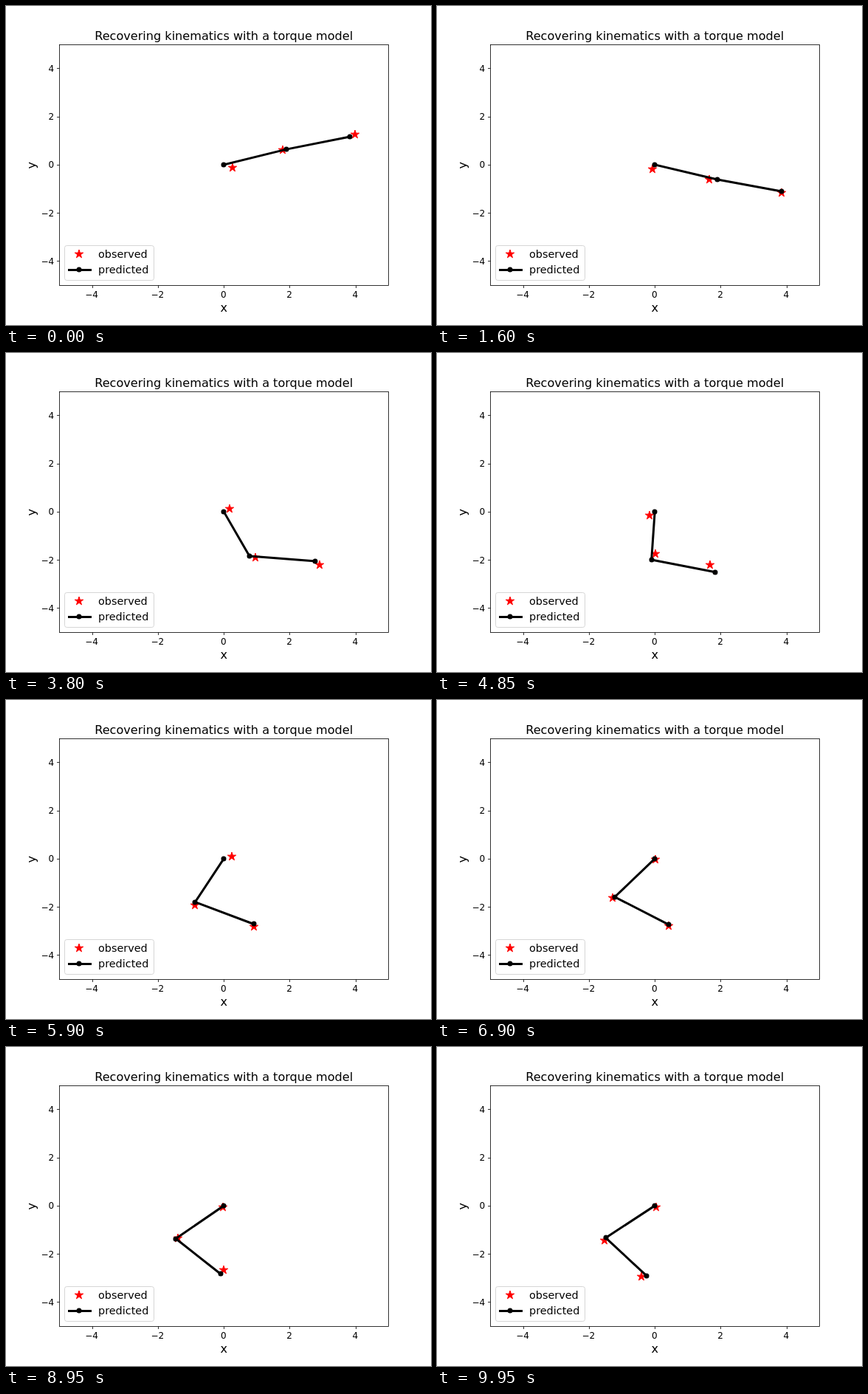
An HTML page that plays this animation: 576x432 px, repeating every 10 s.

```html
<!DOCTYPE html>
<html lang="en">
<head>
<meta charset="utf-8">
<style>
  html, body { margin: 0; width: 576px; height: 432px; overflow: hidden; background: #fff; }
  svg { display: block; font-family: "DejaVu Sans", sans-serif; font-size: 12px; }
  .label { font-size: 16.1px; text-anchor: middle; }
  .legend { font-size: 14.4px; }
  .axis { fill: none; stroke: #000; stroke-width: .8; }
  .arm { fill: none; stroke: #000; stroke-width: 3; stroke-linecap: square; stroke-linejoin: round; }
  .star { fill: red; stroke: red; stroke-linejoin: bevel; }
</style>
</head>
<body>
<svg width="576" height="432" viewBox="0 0 576 432">
  <rect class="axis" x="72.5" y="52.5" width="446" height="326"/>
  <g id="ticks"></g>
  <text class="label" x="295.2" y="46">Recovering kinematics with a torque model</text>
  <text class="label" x="295.2" y="413.5">x</text>
  <text class="label" transform="translate(39.7 215.7) rotate(-90)">y</text>
  <g id="stars"></g>
  <path id="arm" class="arm"/>
  <g id="joints"></g>
  <g class="legend">
    <rect x="79.5" y="324.5" width="121" height="47" rx="2.9" fill="#fff" fill-opacity=".8" stroke="#ccc" stroke-opacity=".8"/>
    <g id="key"></g>
    <path class="arm" d="M85.5 357.5H114.5"/>
    <text x="125" y="341">observed</text>
    <text x="125" y="362">predicted</text>
  </g>
</svg>
<script>
const $ = id => document.getElementById(id);
const STEP = 50, STEPS = 200, LINK = 2, SPREAD = 0.13;

// Key poses: seconds, then the angle of each link in degrees
const poses = [
  [0, 18.6, 15.1], [1.6, -18, -14.1], [2.4, -39.6, -22.4], [3.8, -67.1, -6.1],
  [5.9, -115.8, -27.2], [7.9, -133.7, -41.6], [9.95, -138.2, -51.8]
];

const toPixel = ([x, y]) => [295.2 + 44.64 * x, 214.92 - 32.616 * y];

function slope(k, link) {
  const a = poses[Math.max(k - 1, 0)], b = poses[Math.min(k + 1, poses.length - 1)];
  return (b[link] - a[link]) / (b[0] - a[0]);
}

// Smooth curve through the key poses (cubic Hermite)
function angle(t, link) {
  let k = 0;
  while (k < poses.length - 2 && t > poses[k + 1][0]) k++;
  const a = poses[k], b = poses[k + 1], h = b[0] - a[0], u = (t - a[0]) / h, v = 1 - u;
  const degrees = v * v * (1 + 2 * u) * a[link] + u * u * (3 - 2 * u) * b[link]
    + h * u * v * (v * slope(k, link) - u * slope(k + 1, link));
  return degrees * Math.PI / 180;
}

function predict(t) {
  const points = [[0, 0]];
  for (const link of [1, 2]) {
    const [x, y] = points[link - 1], a = angle(t, link);
    points.push([x + LINK * Math.cos(a), y + LINK * Math.sin(a)]);
  }
  return points;
}

function random(n) {
  const s = Math.sin(n * 12.9898) * 43758.5453;
  return s - Math.floor(s);
}

const gauss = n =>
  Math.sqrt(-2 * Math.log(1 - random(2 * n + 1))) * Math.cos(2 * Math.PI * random(2 * n + 2));

const observe = (step, points) => points.map((p, j) =>
  p.map((v, i) => v + SPREAD * gauss(step * 6 + j * 2 + i)));

const starShape = Array.from({ length: 10 }, (_, i) => {
  const r = i % 2 ? 6 * 0.382 : 6, a = i * Math.PI / 5;
  return [r * Math.sin(a), -r * Math.cos(a)];
}).join(" ");

// Markers sit on whole pixels
const star = p =>
  `<polygon class="star" points="${starShape}" transform="translate(${p.map(Math.round)})"/>`;
const dot = ([x, y]) => `<circle cx="${Math.round(x)}" cy="${Math.round(y)}" r="3.5"/>`;

$("key").innerHTML = star([99, 336]) + dot([99, 357]);
$("ticks").innerHTML = [-4, -2, 0, 2, 4].map(v => {
  const [px, py] = toPixel([v, v]), x = Math.round(px) + .5, y = Math.round(py) + .5;
  const text = String(v).replace("-", "\u2212");
  return `<path class="axis" d="M${x} 378.5v3.5M72.5 ${y}h-3.5"/>
    <text x="${px - .5}" y="395" text-anchor="middle">${text}</text>
    <text x="65.2" y="${py + 4.4}" text-anchor="end">${text}</text>`;
}).join("");

function draw() {
  const step = Math.floor(performance.now() / STEP) % STEPS;
  const points = predict(step * STEP / 1000), pixels = points.map(toPixel);
  $("stars").innerHTML = observe(step, points).map(toPixel).map(star).join("");
  $("arm").setAttribute("d", "M" + pixels.join("L"));
  $("joints").innerHTML = pixels.map(dot).join("");
  requestAnimationFrame(draw);
}
draw();
</script>
</body>
</html>
```
